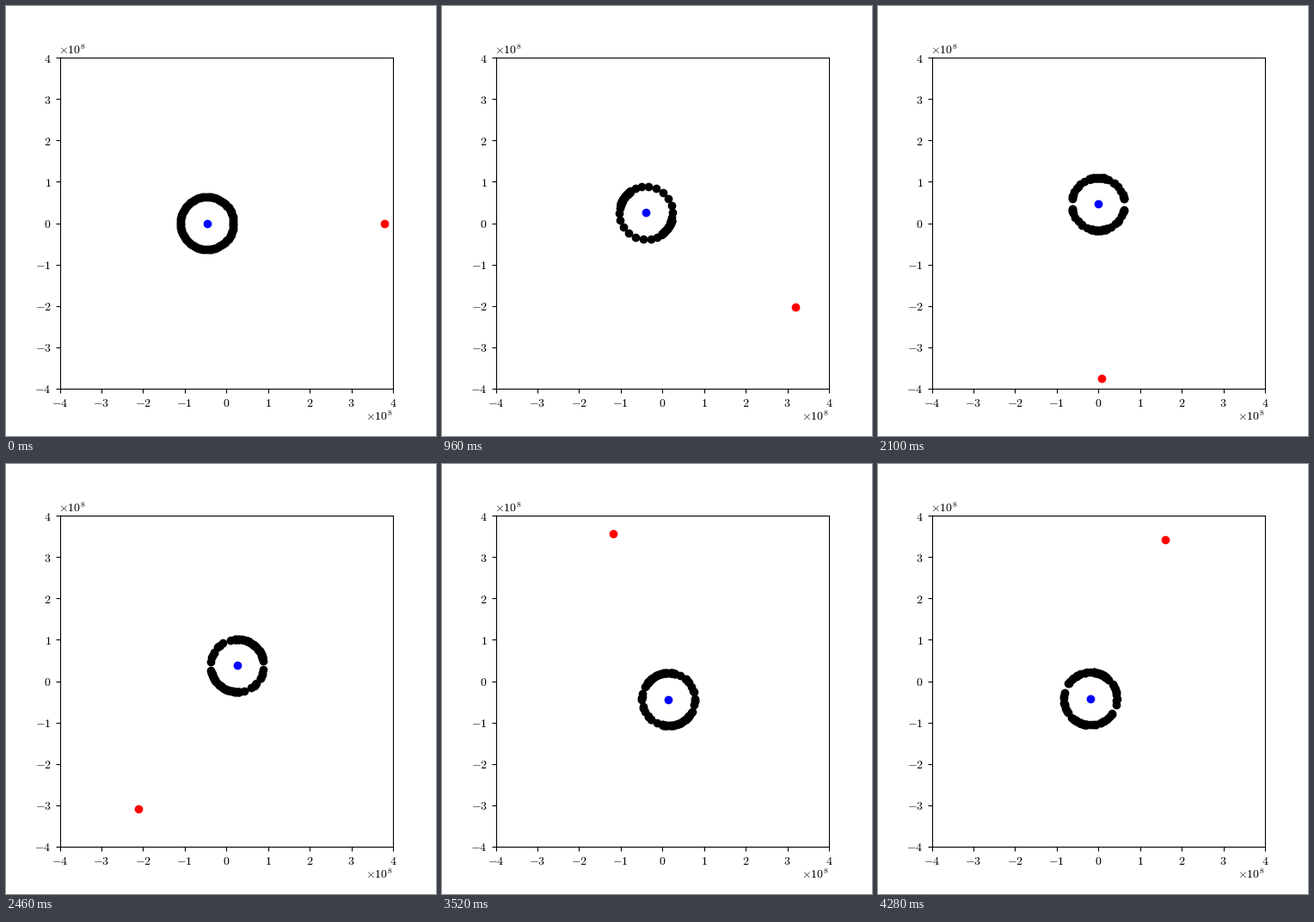
Write a matplotlib script that moves like this. It is 500 by 500 pixels and loops after 4300 ms.

```python
import numpy as np
import matplotlib.pyplot as plt
from matplotlib.animation import FuncAnimation

plt.rcParams["mathtext.fontset"] = "cm"

FRAMES, INTERVAL = 215, 20
ECC = 0.0102            # orbit eccentricity, starting at the far point
MOON_FAR = 3.797e8
EARTH_FAR = 0.467e8     # exaggerated wobble of the planet
RING = 0.637e8          # exaggerated planet radius
PARTICLES = 100
TIDE = 0.0365           # squared libration rate, in units of the orbital rate
SPIN = 0.994            # initial ring rotation, in units of the orbital rate

# Mean anomaly in degrees at a few frames; the step size varies slightly.
KNOT_FRAMES = [10, 48, 86, 123, 153, 176, 196, 214]
KNOT_ANGLES = [6.6, 687.0, 1367.4, 2034.7, 2575.9, 2989.5, 3350.6, 3665.9]


def mean_anomaly(n):
    if n == 0:
        return 0.0
    if n <= 10:     # the first steps grow tenfold each time
        return np.radians(6.6 * 10.0 ** (n - 10))
    return np.radians(np.interp(n, KNOT_FRAMES, KNOT_ANGLES))


def orbit(m):
    """Angle and distance (relative to the far point) at mean anomaly m."""
    angle = m - 2 * ECC * np.sin(m) + 1.25 * ECC**2 * np.sin(2 * m)
    return angle, (1 - ECC) / (1 - ECC * np.cos(angle))


def slope(m, state):
    phi, rate = state
    angle, dist = orbit(m)
    pull = 0.5 * TIDE / (dist * (1 + ECC)) ** 3
    return np.array([rate, -pull * np.sin(2 * (phi - angle))])


def advance(state, start, end, steps=6):
    h = (end - start) / steps
    for i in range(steps):
        m = start + i * h
        k1 = slope(m, state)
        k2 = slope(m + h / 2, state + h / 2 * k1)
        k3 = slope(m + h / 2, state + h / 2 * k2)
        k4 = slope(m + h, state + h * k3)
        state = state + h / 6 * (k1 + 2 * k2 + 2 * k3 + k4)
    return state


def ring_history(times):
    phi = np.linspace(0, 2 * np.pi, PARTICLES, endpoint=False)
    state = np.array([phi, np.full(PARTICLES, SPIN)])
    history = [state[0]]
    for start, end in zip(times, times[1:]):
        state = advance(state, start, end)
        history.append(state[0])
    return history


times = [mean_anomaly(n) for n in range(FRAMES)]
ring_angles = ring_history(times)

fig, ax = plt.subplots(figsize=(5, 5), dpi=100)
fig.subplots_adjust(left=0.125, right=0.9, bottom=0.11, top=0.88)
ticks = np.arange(-4, 5)
labels = [f"${t}$" for t in ticks]
ax.set_xlim(-4e8, 4e8)
ax.set_ylim(-4e8, 4e8)
ax.set_xticks(ticks * 1e8, labels)
ax.set_yticks(ticks * 1e8, labels)
fig.text(0.122, 0.887, r"$\times 10^8$", ha="left", va="baseline")
fig.text(0.9, 0.036, r"$\times 10^8$", ha="right", va="baseline")

ring, = ax.plot([], [], "o", color="black")
earth, = ax.plot([], [], "o", color="blue")
moon, = ax.plot([], [], "o", color="red")


def update(n):
    angle, dist = orbit(times[n])
    ux, uy = dist * np.cos(angle), dist * np.sin(angle)
    ex, ey = -EARTH_FAR * ux, -EARTH_FAR * uy
    phi = ring_angles[n]
    moon.set_data([MOON_FAR * ux], [MOON_FAR * uy])
    earth.set_data([ex], [ey])
    ring.set_data(ex + RING * np.cos(phi), ey + RING * np.sin(phi))
    return ring, earth, moon


anim = FuncAnimation(fig, update, frames=FRAMES, interval=INTERVAL,
                     repeat=True, repeat_delay=0)
plt.show()
```
